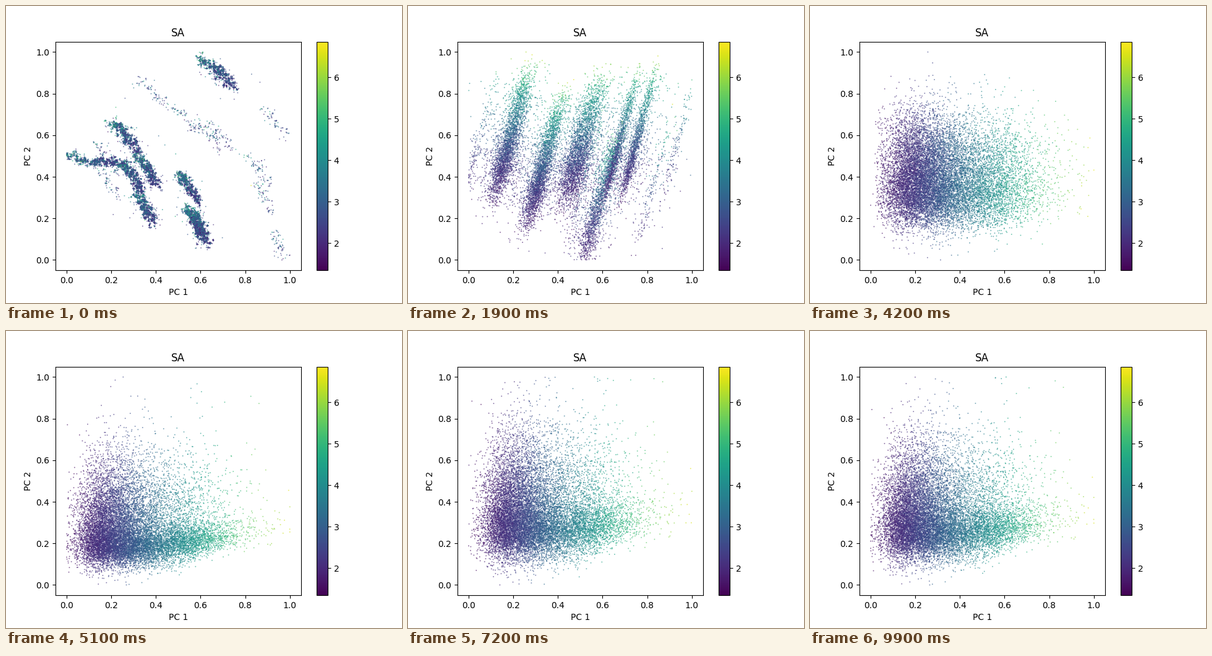
These frames come from a looping animation (640 px wide and 480 px high, 10 s). A matplotlib script:

```python
import numpy as np
import matplotlib.pyplot as plt
from matplotlib.animation import FuncAnimation

N = 15000
FRAMES = 100
V_MIN, V_MAX = 1.345, 6.86
rng = np.random.default_rng(7)


def normal():
    return rng.standard_normal(N)


def fold(p):
    """Reflect stray values back into the unit square."""
    p = np.abs(p)
    return np.clip(np.where(p > 1, 2 - p, p), 0, 1)


# Fixed traits of every point
kind = np.searchsorted((.37, .71, .985), rng.random(N))
score = np.choose(kind, (2.2, 2.85, 3.85, 5.2))
score = score + np.choose(kind, (.26, .35, .58, .55)) * normal()
score = np.clip(score, 1.4, 6.7)
rank, chance = rng.random(N), rng.random(N)
side, along, tail = normal(), normal(), np.abs(normal())


def group(main, faint, share=.955):
    """Spread the points evenly over the main groups, the rest over the faint."""
    n, m = len(main), len(faint)
    index = np.where(rank < share, rank / share * n,
                     n + (rank - share) / (1 - share) * m).astype(int)
    return np.array(main + faint)[index], index


def streaks():
    """Knotted strokes that all bend down to the right, and one level spine."""
    heads, k = group(
        [(.13, .47), (.20, .65), (.24, .46), (.31, .49), (.31, .31), (.50, .41),
         (.54, .25), (.56, .22), (.585, .955)],
        [(.12, .56), (.14, .43), (.30, .86), (.47, .73), (.58, .65), (.62, .66),
         (.80, .50), (.84, .36), (.86, .72), (.92, .14)])
    steps, subs = 14, 8
    t = fold(.55 - .14 * (score - 3) + .28 * along)
    step = np.minimum((t * steps).astype(int), steps - 1)
    sub = (subs * rng.random(N) ** 2).astype(int)
    t = (step + .5) / steps
    p = heads + np.column_stack(((.03 + .14 * heads[:, 1]) * t, -.14 * t ** 1.4))

    spine = k == 0
    x = .26 * t[spine]
    p[spine] = np.column_stack((x, .465 + .05 * np.exp(-x / .04)))

    knots = rng.normal(size=(k.max() + 1, steps, subs, 2)) * (.013, .011)
    jitter = np.clip(rng.standard_t(1.7, (N, 2)) * .0016, -.15, .15)
    return fold(p + knots[k, step, sub] + jitter)


def strands():
    """Leaning strands whose height follows the score."""
    feet, k = group(
        [(.13, .35), (.155, .36), (.28, .23), (.30, .26), (.44, .32), (.48, .33),
         (.54, .09), (.63, .34), (.71, .35)],
        [(.01, .38), (.47, .18), (.78, .15), (.89, .34)])
    rise = .58 * np.tanh(.3 * (score - 2.05 + .3 * along))
    thin = np.where(k > 6, .010, .018)
    spread = np.where(chance < .3, .05, thin)
    return fold(feet + np.column_stack((.28 * rise + spread * side, rise)))


def bands():
    """Level bands with the score running from left to right."""
    y, _ = group([.235, .30, .385, .41, .485, .61, .765], [.07, .86, .97], .98)
    start = .07 * np.exp(-((y - .61) / .05) ** 2)
    x = (score - 1.4) / 5 + start + .05 * along
    spread = np.where(chance < .45, .007, .032)
    return fold(np.column_stack((x, y - .05 * (x - .2) + spread * side)))


def cloud(centre, spread, reach):
    """A fan: score to the right, a long upward tail on the left."""
    x = (score - 1.4) / 5.1 + .03 * along
    lift = chance < np.clip(.8 - .8 * x, .25, .7)
    y = (centre + .17 * np.clip(x - .38, 0, 1)
         + spread * (1 - .3 * x) * side + reach * tail * lift)
    return fold(np.column_stack((x + .05 * (y - centre), y)))


POSES = {0: streaks(), 19: strands(), 33: bands(),
         51: cloud(.185, .050, .190), 63: cloud(.260, .072, .215),
         81: cloud(.205, .065, .190), 99: cloud(.235, .068, .200)}
KEYS = list(POSES)


def positions(i):
    k = min(np.searchsorted(KEYS, i, side="right") - 1, len(KEYS) - 2)
    a, b = KEYS[k:k + 2]
    f = (i - a) / (b - a)
    # Each epoch shakes the points a little before they are rescaled
    shake = np.random.default_rng(i).normal(size=(N, 2))
    p = (1 - f) * POSES[a] + f * POSES[b] + .01 * np.sin(np.pi * f) * shake
    low, high = p.min(axis=0), p.max(axis=0)
    return (p - low) / (high - low)


fig, ax = plt.subplots(figsize=(6.4, 4.8), dpi=100)
dots = ax.scatter(*positions(0).T, c=score, s=1.9, linewidths=0, alpha=.62,
                  cmap="viridis", vmin=V_MIN, vmax=V_MAX)
bar = fig.colorbar(dots, ax=ax)
bar.solids.set_alpha(1)
ax.set(xlim=(-.05, 1.05), ylim=(-.05, 1.05),
       xlabel="PC 1", ylabel="PC 2", title="SA")


def update(i):
    dots.set_offsets(positions(i))
    return (dots,)


anim = FuncAnimation(fig, update, frames=FRAMES, interval=100,
                     repeat=True, repeat_delay=0)
plt.show()
```
